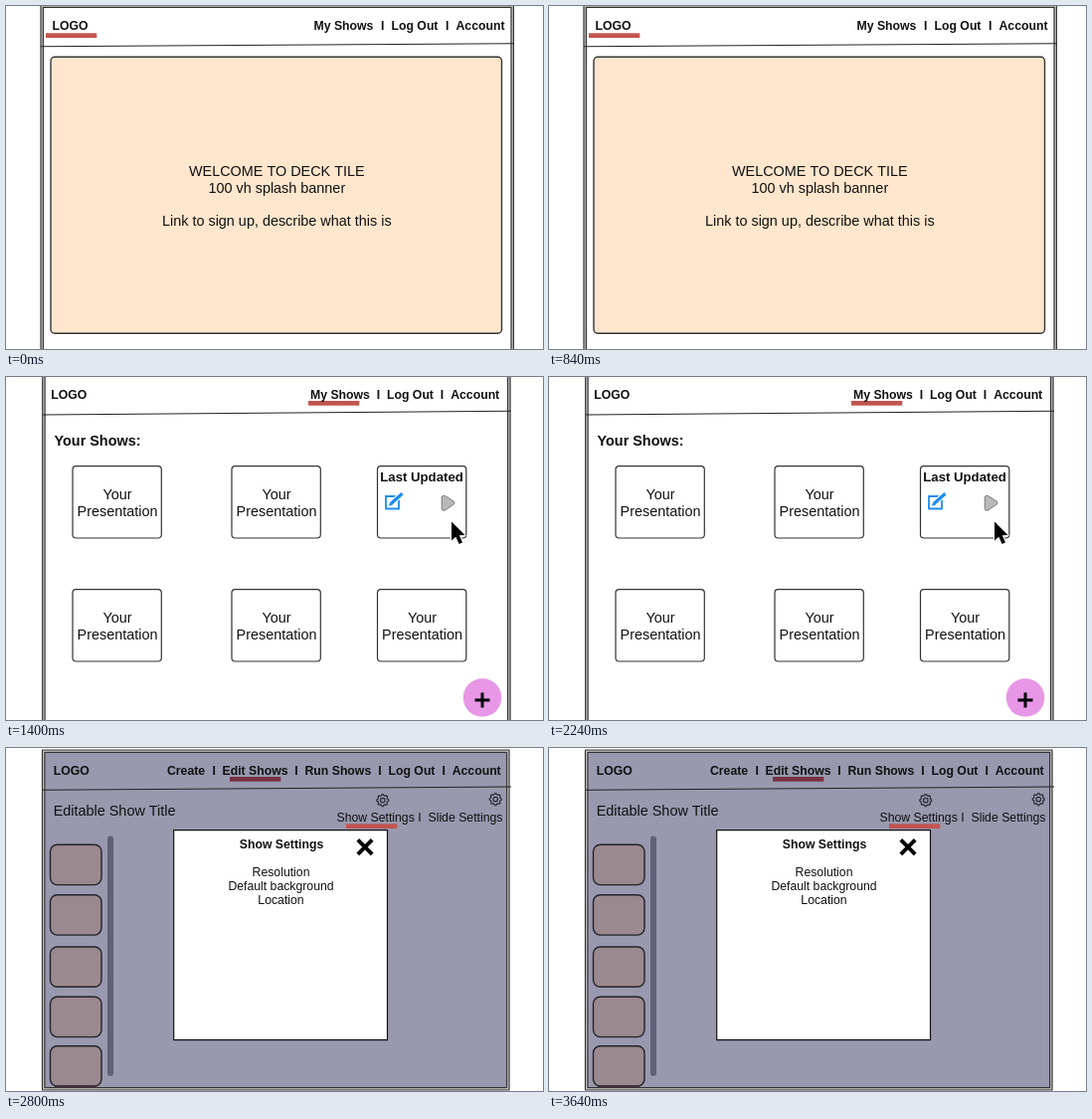
These frames come from a looping animation (540x345 px, 4200 ms). An HTML page with a canvas:

```html
<!DOCTYPE html>
<html lang="en">
<head>
<meta charset="utf-8">
<title>Wireframe walkthrough</title>
<style>
  html, body { margin: 0; width: 100%; height: 100%; overflow: hidden; background: #fff; }
  canvas { display: block; }
</style>
</head>
<body>
<canvas id="stage" width="540" height="345"></canvas>
<script>
const ctx = document.getElementById('stage').getContext('2d');
const HOLD = 1400;
const INK = '#111';
const RED = '#c1544e';
const SMALL = 12.25;
const LARGE = 14.42;

function text(str, x, y, { size = SMALL, bold = false, align = 'left' } = {}) {
  ctx.font = `${bold ? 'bold ' : ''}${size}px "Liberation Sans", Arial, sans-serif`;
  ctx.textAlign = align;
  ctx.fillStyle = INK;
  ctx.fillText(str, x, y);
}

function line(x1, y1, x2, y2, color = '#222', width = 1.1) {
  ctx.beginPath();
  ctx.moveTo(x1, y1);
  ctx.lineTo(x2, y2);
  ctx.strokeStyle = color;
  ctx.lineWidth = width;
  ctx.stroke();
}

function box(x, y, w, h, { radius = 0, fill, stroke = '#333', width = 1.2 } = {}) {
  ctx.beginPath();
  ctx.roundRect(x, y, w, h, radius);
  if (fill) { ctx.fillStyle = fill; ctx.fill(); }
  if (stroke) { ctx.strokeStyle = stroke; ctx.lineWidth = width; ctx.stroke(); }
}

function polygon(points, fill, stroke) {
  ctx.beginPath();
  points.forEach(([x, y]) => ctx.lineTo(x, y));
  ctx.closePath();
  ctx.lineJoin = 'round';
  if (stroke) { ctx.strokeStyle = stroke; ctx.lineWidth = 2; ctx.stroke(); }
  ctx.fillStyle = fill;
  ctx.fill();
}

function disc(x, y, r, fill) {
  ctx.beginPath();
  ctx.arc(x, y, r, 0, Math.PI * 2);
  ctx.fillStyle = fill;
  ctx.fill();
}

function underline(x, y, color = RED) {
  ctx.fillStyle = color;
  ctx.fillRect(x, y, 51.3, 4.7);
}

// Double-ruled browser outline with a soft grey gap
function pageFrame(left, top, right, bottom, fill = '#fff') {
  const gap = 2.4;
  box(left, top, right - left, bottom - top, { fill: '#ccc' });
  box(left + gap, top + gap, right - left - 2 * gap, bottom - top - 2 * gap, { fill });
}

function nav(logoX, y, items, bars) {
  text('LOGO', logoX, y, { bold: true });
  items.forEach(([label, x]) => text(label, x, y, { bold: true }));
  bars.forEach(x => text('I', x, y, { bold: true, align: 'center' }));
}

function splashPage() {
  pageFrame(35, -1, 510.4, 360);
  line(35, 40.8, 511, 37.8);
  underline(40, 27.3);
  nav(46.5, 24.4, [['My Shows', 309.5], ['Log Out', 387.5], ['Account', 452.5]], [378.7, 443.7]);
  box(45, 51.3, 453.5, 278, { radius: 4, fill: '#ffe6cd', width: 1.4 });
  const centered = { size: LARGE, align: 'center' };
  text('WELCOME TO DECK TILE', 272.3, 171, centered);
  text('100 vh splash banner', 272.3, 188, centered);
  text('Link to sign up, describe what this is', 272.3, 220.5, centered);
}

function editIcon(x, y) {
  const blue = '#1b8cf0';
  box(x + 1, y + 2.5, 13, 12.5, { stroke: blue, width: 1.8 });
  line(x + 5, y + 11, x + 17.5, y - 0.5, '#fff', 5.5);
  line(x + 6, y + 10, x + 17.5, y - 0.2, blue, 3.2);
  polygon([[x + 4, y + 12.3], [x + 5, y + 8.5], [x + 7.8, y + 11.3]], blue);
}

function playIcon(x, y) {
  ctx.beginPath();
  ctx.moveTo(x + 0.7, y + 2.5);
  ctx.quadraticCurveTo(x + 1, y, x + 4, y + 1);
  ctx.lineTo(x + 12.5, y + 6.5);
  ctx.quadraticCurveTo(x + 14.5, y + 8, x + 12.5, y + 9.7);
  ctx.lineTo(x + 4, y + 15.5);
  ctx.quadraticCurveTo(x + 1, y + 16.5, x + 0.7, y + 14);
  ctx.closePath();
  ctx.fillStyle = '#b9b9b9';
  ctx.strokeStyle = '#777';
  ctx.lineWidth = 1;
  ctx.fill();
  ctx.stroke();
}

function cursor(x, y) {
  polygon([[x, y], [x, y + 19], [x + 4.3, y + 15.2], [x + 7.6, y + 22.5],
    [x + 11, y + 21], [x + 7.8, y + 13.8], [x + 13.5, y + 13.5]], '#000', '#fff');
}

function showsPage() {
  pageFrame(36.7, -6, 507, 360);
  line(37, 38, 508, 34.3);
  underline(304, 24);
  nav(45.2, 21.5, [['My Shows', 306], ['Log Out', 383], ['Account', 447.2]], [374.4, 438.5]);
  text('Your Shows:', 48.5, 69, { size: LARGE, bold: true });

  for (const y of [89.7, 213.7]) {
    for (const x of [67, 227, 373.5]) {
      box(x, y, 89.3, 72.3, { radius: 3.5 });
      if (x > 300 && y < 100) continue;
      const label = { size: LARGE, align: 'center' };
      text('Your', x + 45, y + 33.5, label);
      text('Presentation', x + 45, y + 50, label);
    }
  }
  text('Last Updated', 418, 105.2, { size: 13.2, bold: true, align: 'center' });
  editIcon(381, 117.5);
  playIcon(437.5, 118.5);
  cursor(448, 145.5);

  disc(479, 322.5, 19.3, '#e897e6');
  line(471.5, 325, 486.5, 325, '#000', 3);
  line(479, 317.5, 479, 332.5, '#000', 3);
}

function gear(x, y) {
  const teeth = 8;
  ctx.beginPath();
  for (let i = 0; i < teeth * 4; i++) {
    const angle = (i - 0.5) * Math.PI * 2 / (teeth * 4);
    const r = i % 4 < 2 ? 6 : 4.9;
    ctx.lineTo(x + r * Math.cos(angle), y + r * Math.sin(angle));
  }
  ctx.closePath();
  ctx.strokeStyle = '#2a2b35';
  ctx.lineWidth = 1.2;
  ctx.stroke();
  ctx.beginPath();
  ctx.arc(x, y, 2.3, 0, Math.PI * 2);
  ctx.stroke();
}

function settingsPage() {
  pageFrame(36.5, 2, 506, 344, '#9899ae');
  line(37, 42.3, 508, 39);
  underline(225, 29, '#783140');
  nav(47.8, 27, [['Create', 162], ['Edit Shows', 217.5], ['Run Shows', 300.5],
    ['Log Out', 384.5], ['Account', 448.7]], [209.3, 292, 376, 440.3]);

  text('Editable Show Title', 47.7, 68, { size: LARGE });
  gear(378.8, 52.6);
  gear(492.2, 51.6);
  underline(342, 76.3, '#c25351');
  text('Show Settings', 332.5, 74.2);
  text('I', 416, 74.2, { align: 'center' });
  text('Slide Settings', 424.5, 74.2);

  for (const y of [97.3, 147.8, 200, 250.3, 299.7]) {
    box(44.5, y, 51.5, 40.3, { radius: 7, fill: '#9a898e', stroke: '#23232b', width: 1.4 });
  }
  line(49, 340.5, 91, 340.5, '#452c42', 1.4);
  box(102, 88.5, 6, 241.5, { radius: 3, fill: '#606178', stroke: null });

  box(168.7, 82.7, 214.8, 211, { fill: '#fff', stroke: '#111' });
  text('Show Settings', 277, 101, { bold: true, align: 'center' });
  ['Resolution', 'Default background', 'Location'].forEach((label, i) =>
    text(label, 276.5, 129.2 + i * 14, { align: 'center' }));
  line(353.8, 92.4, 368.2, 106.8, '#000', 3.8);
  line(368.2, 92.4, 353.8, 106.8, '#000', 3.8);
}

const scenes = [splashPage, showsPage, settingsPage];
const start = performance.now();

function render() {
  const elapsed = Math.max(0, performance.now() - start);
  ctx.fillStyle = '#fff';
  ctx.fillRect(0, 0, 540, 345);
  scenes[Math.floor(elapsed / HOLD) % scenes.length]();
  requestAnimationFrame(render);
}
render();
</script>
</body>
</html>
```
